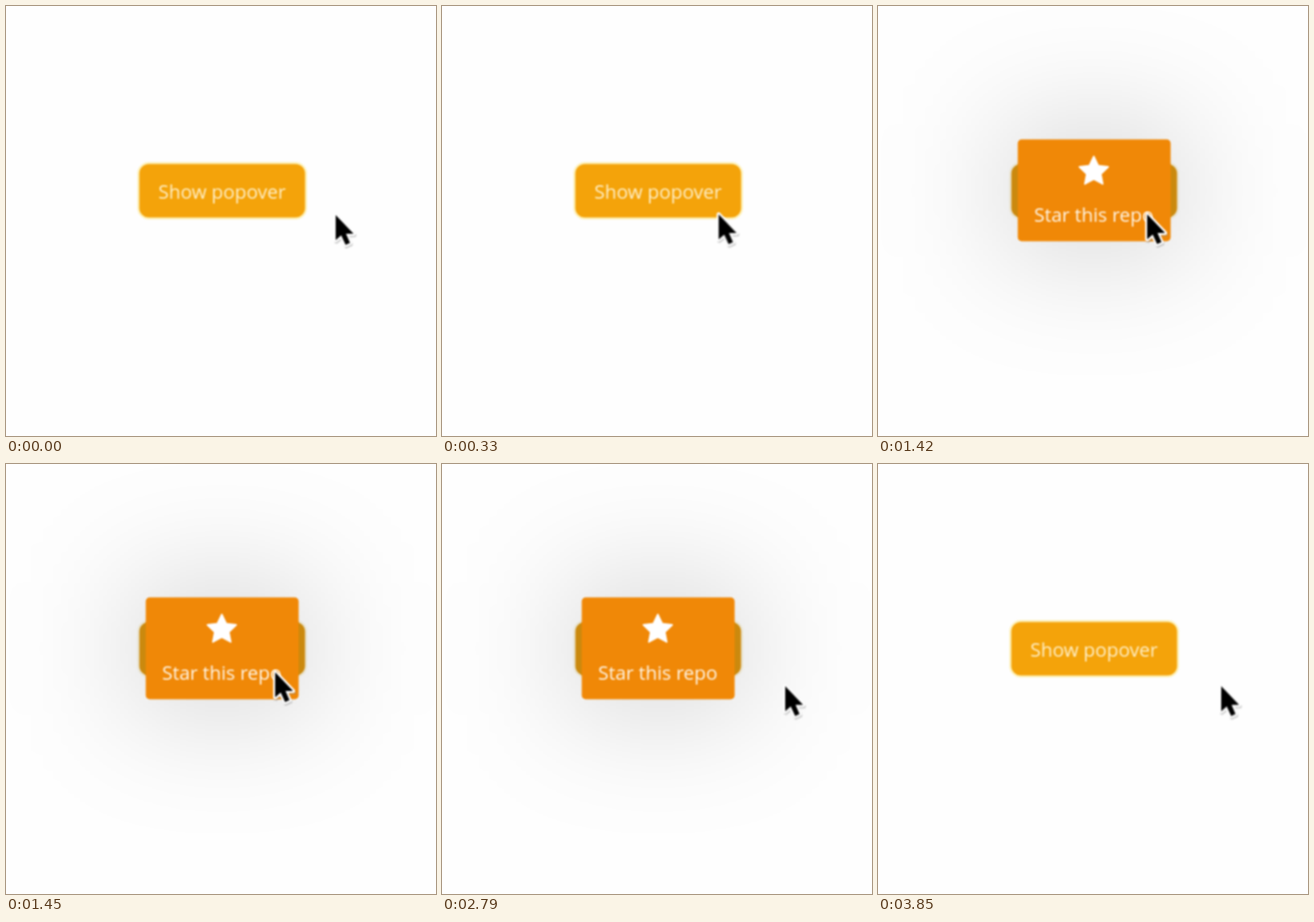
Animation of 540x540 px, one loop 4.18 s. Source, as an HTML page:

```html
<!DOCTYPE html>
<html lang="en">
<head>
<meta charset="utf-8">
<title>Popover</title>
<style>
  html, body { margin: 0; width: 100%; height: 100%; overflow: hidden; background: #fefefe; }
  svg { display: block; width: 100vw; height: 100vh; }
  text { font: 24px "Open Sans", "Noto Sans", sans-serif; text-anchor: middle; }

  .soft { filter: blur(1px); }
  .button { fill: #f4a30a; stroke: #fdf0b6; stroke-width: 5; paint-order: stroke; }
  .label { fill: #fff1cb; }
  .shadow { fill: #000; fill-opacity: .15; filter: blur(75px); }
  .panel { fill: #f08807; }
  .star { fill: #fff; stroke: #fff; stroke-width: 2; stroke-linejoin: round; }
  .caption { fill: #fff8ec; }
  .arrow { stroke-linejoin: round; }

  .button, .label, .popover, .cursor { animation: 4180ms step-end infinite; }
  .button { animation-name: dim; }
  .label { animation-name: press; }
  .popover { animation-name: open; }
  .cursor { animation-name: move; animation-timing-function: linear; }

  @keyframes dim {
    0%, 90.67% { fill: #f4a30a; stroke: #fdf0b6; }
    33.97% { fill: #d9930f; stroke: #f8f2dc; }
  }
  @keyframes press {
    0%, 90.67% { opacity: 1; }
    15.31% { opacity: .55; }
    18.18% { opacity: .17; }
  }
  @keyframes open {
    0%, 90.67% { visibility: hidden; }
    33.97% { visibility: visible; }
  }
  @keyframes move {
    0% { transform: translate(413px, 261px); }
    .7% { transform: translate(413px, 261px); animation-timing-function: ease; }
    13% { transform: translate(337px, 260px); animation-timing-function: step-end; }
    60.28% { transform: translate(337px, 262px); }
    61.24% { transform: translate(337px, 262px); animation-timing-function: ease-in-out; }
    66.75%, 100% { transform: translate(430px, 277.5px); }
  }
</style>
</head>
<body>
<svg viewBox="0 0 540 540">
  <defs>
    <path id="pointer" d="M1 1.5V33L8 27 13.5 39 19 36.5 14 25H23.5Z"/>
  </defs>
  <g class="soft">
    <rect class="button" x="167.5" y="198.5" width="208" height="67" rx="12"/>
    <text class="label" x="271.3" y="241.5">Show popover</text>
  </g>
  <g class="popover">
    <rect class="shadow" x="155" y="147" width="233" height="169" rx="20"/>
    <g class="soft">
      <rect class="panel" x="175.5" y="167.5" width="192" height="128" rx="5"/>
      <path class="star" transform="translate(271 208)"
        d="M0-19 5.5-7.5 18.1-5.9 8.8 2.9 11.2 15.4 0 9.3-11.2 15.4-8.8 2.9-18.1-5.9-5.5-7.5Z"/>
      <text class="caption" x="271" y="270.5">Star this repo</text>
    </g>
  </g>
  <g class="cursor">
    <g class="soft arrow">
      <use href="#pointer" x="1" y="2" fill="#888" stroke="#888" stroke-width="5" opacity=".4"/>
      <use href="#pointer" stroke="#fff" stroke-width="5" paint-order="stroke"/>
    </g>
  </g>
</svg>
</body>
</html>
```
